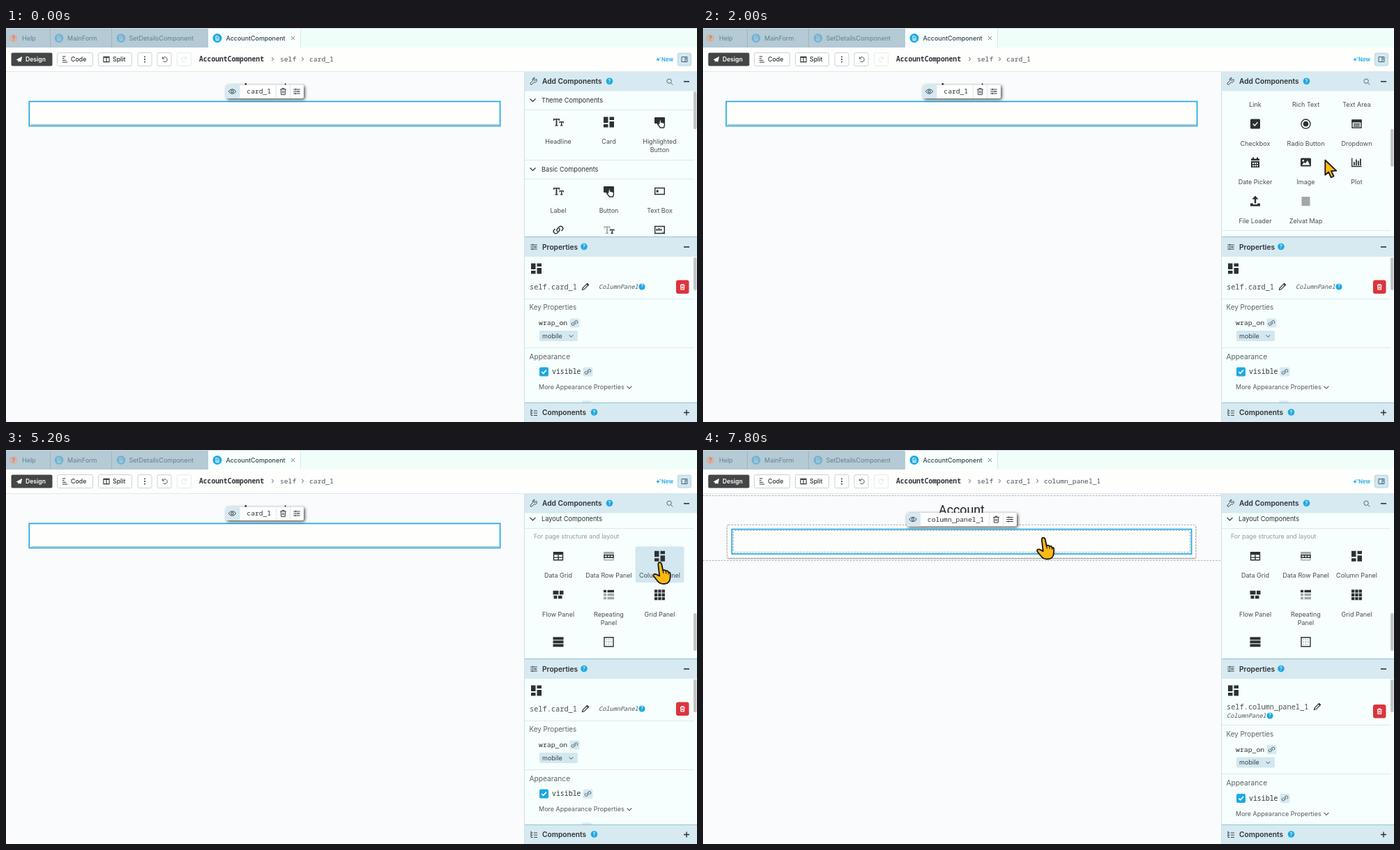
An HTML page with a canvas that plays this animation: 991 by 565 pixels, repeating every 8000 ms.

```html
<!DOCTYPE html>
<html lang="en">
<head>
<meta charset="utf-8">
<title>Form designer</title>
<style>
html, body { margin: 0; width: 100%; height: 100%; overflow: hidden; background: #fafbfd; }
canvas { display: block; }
</style>
</head>
<body>
<canvas id="stage" width="991" height="565"></canvas>
<script>
const ctx = document.getElementById('stage').getContext('2d');
const UI = 'Inter, "Open Sans", sans-serif';
const MONO = '"Noto Sans Mono", "DejaVu Sans Mono", monospace';
const INK = '#2d3135', SOFT = '#474c50', BLUE = '#1ea9e1', PALE = '#d6e9f1', MINT = '#f6fffd', LINE = '#dce8ec';
const LOOP = 8000, NOTCH = 69.15, SELECT = 5600, DROP = 7600;
const NOTCHES = [1250, 1500, 1750, 2250, 2600, 3250, 3500, 4300];

// f/g/w fill in ink, grey, white; s/h/x stroke in the same colours
const ICONS = {
  tt: 'f:M-7-5H2V-2H.8V-3.6H-1.6V4.2H-.4V5.4H-4.6V4.2H-3.4V-3.6H-5.8V-2H-7Z|f:M1.5-1H8V1.4H7V.3H5.5V4.3H6.4V5.4H3V4.3H4V.3H2.6V1.4H1.5Z',
  rich: 'g:M-7-5H2V-2H.8V-3.6H-1.6V4.2H-.4V5.4H-4.6V4.2H-3.4V-3.6H-5.8V-2H-7Z|f:M1.5-1H8V1.4H7V.3H5.5V4.3H6.4V5.4H3V4.3H4V.3H2.6V1.4H1.5Z',
  panel: 'f:M-7.5-7.5h6.5v8.5h-6.5zM-7.5 3h6.5v4.5h-6.5zM1-7.5h6.5v4.5h-6.5zM1-1h6.5v8.5h-6.5z',
  button: 'f:M-6.5-7h13q1 0 1 1v7q0 1-1 1h-13q-1 0-1-1v-7q0-1 1-1z|w:M0-3q1.2-1 2 0v3l4 1q1.5 1 1 3l-1 4h-5l-4-5q0-1.5 2-.6z|s:M0-3q1.2-1 2 0v3l4 1q1.5 1 1 3l-1 4h-5l-4-5q0-1.5 2-.6z',
  box: 's:M-6.8-4.5h13.6v9h-13.6z|f:M-4.8-1.6h3v3.2h-3z',
  area: 's:M-6.8-5h13.6v10h-13.6z|f:M-5-1.5h2v2.8h-2zM-2-2.5h2v3.8h-2zM1-1.5h2v2.8h-2zM4 3h2v1h-2z',
  link: 's:M-1 2.5A3.2 3.2 0 0 1-1-2l2.5-2.5A3.2 3.2 0 0 1 6 0L4.5 1.5M1-2.5A3.2 3.2 0 0 1 1 2L-1.5 4.5A3.2 3.2 0 0 1-6 0L-4.5-1.5',
  check: 'f:M-5.5-7h11q1.5 0 1.5 1.5v11q0 1.5-1.5 1.5h-11q-1.5 0-1.5-1.5v-11q0-1.5 1.5-1.5z|x:M-3.2 0L-.8 2.4 3.5-2.4',
  radio: 's:M6.6 0A6.6 6.6 0 1 1-6.6 0 6.6 6.6 0 1 1 6.6 0z|f:M3.8 0A3.8 3.8 0 1 1-3.8 0 3.8 3.8 0 1 1 3.8 0z',
  drop: 's:M-6.5-5.5h13v11h-13z|f:M-7-6h14v4h-14zM-4.5-.5h9v1.4h-9zM-4.5 2.3h9v1.4h-9z',
  date: 'f:M-6-5.5h12v2.5h-12zM-6-2h12v9h-12zM-4-7.5h2v3h-2zM2-7.5h2v3h-2z|w:M-4 0h2v2h-2zM-1 0h2v2h-2zM2 0h2v2h-2zM-4 3.5h2v2h-2zM-1 3.5h2v2h-2zM2 3.5h2v2h-2z',
  image: 'f:M-6-6.5h12q1.5 0 1.5 1.5v9q0 1.5-1.5 1.5h-12q-1.5 0-1.5-1.5v-9q0-1.5 1.5-1.5z|w:M-5.5 3.5L-2.5-.5-.8 1.2 2.5-3 5.8 3.5zM-5-4h2.4v2.4h-2.4z',
  plot: 's:M-6.8-6.5V5.5H7|f:M-4.5-1h1.8v5h-1.8zM-1.5-4.5h1.8v8.5h-1.8zM1.5-2.5h1.8v6.5h-1.8zM4.5-5.5h1.8v9.5h-1.8z',
  upload: 'f:M0-8L4.5-3H1.2V3H-1.2V-3H-4.5zM-7 3h4v1.5h6v-1.5h4v4h-14z',
  tile: 'f:M-5.5-5.5h11v11h-11z',
  greyTile: 'g:M-6-6.5h12v13h-12z',
  spacer: 's:M-7.5-6h15M-7.5 6h15M0-3.5V3.5M-2.5-1.8L0-4 2.5-1.8M-2.5 1.8L0 4 2.5 1.8',
  shapes: 'g:M0-8L3.8-1.5H-3.8zM-1 4A3.3 3.3 0 1 1-7.6 4 3.3 3.3 0 1 1-1 4z|f:M1 0h6.5v6.5h-6.5z',
  timer: 's:M0-6.5A6.5 6.5 0 1 1-5-4M0-6.5V-3.5M0 0L-3-3',
  grid: 's:M-6.5-5.5h13v11h-13zM-6.5 1.8h13M0-2v7.5|f:M-7-6h14v4h-14z',
  rowPanel: 'h:M-6.5-5.5h13v11h-13z|g:M-7-6h14v3h-14z|s:M-6.5-1.5h13v3.5h-13zM-2-1.5v3.5M2-1.5v3.5',
  flow: 'f:M-7.5-6h8v5.5h-8zM2-6h5.5v5.5H2zM-6.5 1h5v4.5h-5zM0 1h5.5v4.5H0z',
  repeat: 'f:M-7.5-7h4v3.5h-4zM-2-7h9.5v3.5h-9.5z|g:M-7.5-2h4v3.5h-4zM-2-2h9.5v3.5h-9.5zM-7.5 3h4v3.5h-4zM-2 3h9.5v3.5h-9.5z',
  nine: 'f:' + [-7.5, -2.2, 3.1].map(y => [-7.5, -2.2, 3.1].map(x => `M${x} ${y}h4.3v4.3h-4.3z`).join('')).join(''),
  bars: 'f:M-7.5-7h15v4h-15zM-7.5-2h15v4h-15zM-7.5 3h15v4h-15z',
  frame: 's:M-6.5-6.5h13v13h-13z|h:M-4 0h1.5M-1 0h2M2.5 0h1.5M0-4v1.5M0 2.5v1.5M-3.5-3.5h1M2.5-3.5h1M-3.5 3.5h1M2.5 3.5h1',
  plane: 'f:M5-5L3 4.5 0 3-1.5 5-2 2-5 .5z',
  code: 's:M-4-4h5M-4-1h3M-4 2h6M-4 5h8',
  split: 's:M-4.5-4h9v8h-9zM0-4v8M-4.5-3h9',
  dots: 'f:M-.8-4.5h1.6v1.8h-1.6zM-.8-.9h1.6v1.8h-1.6zM-.8 2.7h1.6v1.8h-1.6z',
  undo: 's:M-3.5-4v3h3M-3.2-1.3A3.8 3.8 0 1 1-2.5 2.8',
  redo: 's:M3.5-4v3h-3M3.2-1.3A3.8 3.8 0 1 0 2.5 2.8',
  spark: 'f:M-.5-3.5L.5-.7 3.3.3.5 1.3-.5 4-1.5 1.3-4.3.3-1.5-.7zM3-4l.5 1 1 .5-1 .5-.5 1-.5-1-1-.5 1-.5z',
  side: 's:M-4-3.5h8v7h-8zM1-3.5v7M2-1.5h1M2 0h1',
  wrench: 's:M3.8-3.5L2-1.8 0-2-.2-4 1.5-5.2C-.8-6-2.5-3.5-1.5-1.2L-5 2.5Q-5.5 4.5-3.2 4.5L.5 1C3 2 5.2-.5 3.8-3.5z',
  search: 's:M2.3-.8A3.2 3.2 0 1 1-4.1-.8 3.2 3.2 0 1 1 2.3-.8zM1.5 1.6L4.3 4.4',
  minus: 'f:M-4-.8h8v1.6h-8z',
  plus: 'f:M-4-.7h3.3V-4H.7v3.3H4V.7H.7V4H-.7V.7H-4z',
  sliders: 's:M-4.8-3h9.6M-4.8 0h9.6M-4.8 3h9.6M-1.5-4.2v2.4M2-1.2v2.4M-2 1.8v2.4',
  pencil: 's:M-4.5 4.5l.7-2.6L2-3.9l1.9 1.9-5.8 5.8z|f:M1.3-4l1.5-1.3 2.5 2.5L4-1.3z',
  trash: 's:M-4.3-3h8.6M-1.5-3v-1.5h3V-3M-3.3-3l.5 7.6h5.6l.5-7.6M-1-.9v3.5M1-.9v3.5',
  eye: 's:M-5.3 0Q0-6.5 5.3 0 0 6.5-5.3 0zM1.7 0A1.7 1.7 0 1 1-1.7 0 1.7 1.7 0 1 1 1.7 0z',
  tree: 's:M-4-5v9M-4-2.5h2.5M-4 .7h2.5M-4 4h2.5M0-2.5h5M0 .7h5M0 4h5',
  chevron: 's:M-4-2L0 2 4-2',
  cross: 's:M-2.4-2.4l4.8 4.8M2.4-2.4l-4.8 4.8',
  doc: 's:M-2-3h2.5l1.7 1.7V3.2H-2zM-.8.2h1.8M-.8 1.6h1.8'
};
for (const k in ICONS) ICONS[k] = ICONS[k].split('|').map(p => [p[0], new Path2D(p.slice(2))]);

const HAND = new Path2D('M-2.6 3Q-3-.8-.6-.8T2.5 2.5L4.2 11Q6.5 9 8.3 11.5 11 10.3 12 13.2 14.8 13 14.8 16.5L14.5 22Q13.5 30 5.5 30-.5 30-3.5 26L-9.5 18.5Q-9.5 15.2-6 16L-.8 18.6z');
const ARROW = new Path2D('M.3 0V21.2L5.2 17 8.8 24.8 12.6 23 9 15.6 16.3 15.2z');
const KNUCKLES = new Path2D('M4.2 11l.8 4M8.3 11.8l.5 3.6M12 13.4l.2 3');

const COLS = [792, 864.5, 937.5];
const SECTIONS = [
  ['Theme Components', 103.5, 0],
  ['Basic Components', 202.5, 189],
  ['More Components', 510.5, 497],
  ['Layout Components', 652, 638]
];
const ROWS = [
  [135, 'Headline:tt', 'Card:panel', 'Highlighted/Button:button'],
  [234, 'Label:tt', 'Button:button', 'Text Box:box'],
  [289.5, 'Link:link', 'Rich Text:rich', 'Text Area:area'],
  [345, 'Checkbox:check', 'Radio Button:radio', 'Dropdown:drop'],
  [400.5, 'Date Picker:date', 'Image:image', 'Plot:plot'],
  [456, 'File Loader:upload', 'Zelvat Map:greyTile'],
  [542, 'Vundelo Video:tile', 'Spacer:spacer', 'Canvas:shapes'],
  [597.5, 'Timer:timer'],
  [705.5, 'Data Grid:grid', 'Data Row Panel:rowPanel', 'Column Panel:panel'],
  [761, 'Flow Panel:flow', 'Repeating/Panel:repeat', 'Grid Panel:nine'],
  [828.5, 'Linear Panel:bars', 'XY Panel:frame']
];

const clamp = v => Math.max(0, Math.min(1, v));
const easeOut = v => 1 - (1 - clamp(v)) ** 2;
const easeIn = v => clamp(v) ** 2;
const smooth = v => { v = clamp(v); return v * v * (3 - 2 * v); };
const mix = (a, b, k) => a + (b - a) * k;

function rect(x, y, w, h, fill, r = 0, stroke) {
  ctx.beginPath();
  ctx.roundRect(x, y, w, h, r);
  if (fill) { ctx.fillStyle = fill; ctx.fill(); }
  if (stroke) { ctx.strokeStyle = stroke; ctx.lineWidth = 1; ctx.stroke(); }
}

function text(s, x, y, size, { c = INK, w = 400, a = 'left', f = UI, i = '' } = {}) {
  ctx.font = `${i} ${w} ${size}px ${f}`;
  ctx.textAlign = a;
  ctx.fillStyle = c;
  ctx.fillText(s, x, y + size * .35);
}
const mono = (s, x, y, size, o) => text(s, x, y, size, { f: MONO, ...o });

function icon(name, x, y, c = INK, s = 1, lw = 1.4) {
  const col = { f: c, s: c, g: '#a3a6a8', h: '#a3a6a8', w: MINT, x: '#fff' };
  ctx.save();
  ctx.translate(x, y);
  ctx.scale(s, s);
  ctx.lineWidth = lw;
  for (const [m, p] of ICONS[name]) {
    ctx.fillStyle = ctx.strokeStyle = col[m];
    'fgw'.includes(m) ? ctx.fill(p) : ctx.stroke(p);
  }
  ctx.restore();
}

function dot(x, y, r, c) {
  ctx.beginPath();
  ctx.arc(x, y, r, 0, 7);
  ctx.fillStyle = c;
  ctx.fill();
}

function help(x, y, r = 4.8, c = BLUE, ink = '#fff') {
  dot(x, y, r, c);
  text('?', x, y, r * 1.5, { c: ink, w: 500, a: 'center' });
}

function dashed(x, y, w, h) {
  ctx.setLineDash([2.5, 1.8]);
  rect(x, y, w, h, null, 2, '#a6a8ab');
  ctx.setLineDash([]);
}

function dashRule(y) {
  ctx.setLineDash([2.5, 1.8]);
  ctx.strokeStyle = '#b0b2b5';
  ctx.lineWidth = 1;
  ctx.beginPath();
  ctx.moveTo(0, y);
  ctx.lineTo(743, y);
  ctx.stroke();
  ctx.setLineDash([]);
}

function tabs() {
  rect(0, 0, 991, 28, '#f0fefa');
  rect(0, 0, 290, 28, '#b4cad5');
  rect(290, 0, 132, 28, '#f8fffd');
  [63, 151].forEach(x => rect(x, 1, 1, 27, '#9cb5c2'));
  rect(422, 0, 1, 28, LINE);
  rect(0, 0, 991, 1, '#d2dde1');
  const dim = { c: '#64808e' };
  help(10.5, 14.5, 6, '#d6b3a9', '#a8766b');
  text('Help', 23, 14.5, 9, dim);
  [76, 165].forEach(x => { dot(x, 14.5, 6.3, '#72b3d1'); icon('doc', x, 14.5, '#b9d3df', 1, 1); });
  text('MainForm', 88, 14.5, 9, dim);
  text('SetDetailsComponent', 176.5, 14.5, 9, dim);
  dot(303, 14.5, 6.5, BLUE);
  icon('doc', 303, 14.5, '#fff', 1, 1);
  text('AccountComponent', 315.5, 14.5, 8.9, { c: '#2f4450', w: 500 });
  icon('cross', 411.5, 14.5, '#5f6f78', 1, 1);
}

function toolbar(dropped) {
  rect(0, 28, 991, 35, '#fefffd');
  rect(0, 62, 991, 1, LINE);
  rect(7.5, 35.5, 59, 19, '#434547', 2);
  icon('plane', 19, 45, '#fff', .85);
  text('Design', 28, 45, 8.6, { c: '#fff', w: 600 });
  [[73, 52], [132, 49], [188.5, 21], [216.5, 21]].forEach(([x, w]) => rect(x + .5, 35.5, w - 1, 19, null, 2, '#cbd3d7'));
  rect(245.5, 35.5, 20, 19, null, 2, '#e6ebec');
  icon('code', 84.5, 44.5, INK, .9, 1.1);
  text('Code', 93, 45, 8.8, { w: 500 });
  icon('split', 144, 45, INK, .9, 1.2);
  text('Split', 153, 45, 8.8, { w: 500 });
  icon('dots', 199, 45);
  icon('undo', 227.5, 45, SOFT, .9, 1.1);
  icon('redo', 255.5, 45, '#dde3e5', .9, 1.1);
  const grey = { c: '#4c5156' };
  mono('AccountComponent', 277, 44.7, 9.7, { w: 600 });
  mono('self', 393, 44.7, 9.7, grey);
  mono('card_1', 435, 44.7, 9.7, grey);
  const arrows = dropped ? [382.5, 425.5, 479.5] : [382.5, 425.5];
  if (dropped) mono('column_panel_1', 489, 44.7, 9.7, grey);
  ctx.strokeStyle = SOFT;
  ctx.lineWidth = 1;
  for (const x of arrows) {
    ctx.beginPath();
    ctx.moveTo(x - 1.3, 42);
    ctx.lineTo(x + 1.3, 44.5);
    ctx.lineTo(x - 1.3, 47);
    ctx.stroke();
  }
  icon('spark', 935.5, 45, BLUE, .85);
  text('New', 940, 45.5, 7.8, { c: BLUE, w: 600 });
  rect(963.5, 36, 19, 18, '#d2e7f0', 2, '#b7d5e2');
  icon('side', 973, 45, '#47616e', 1, 1);
}

function popup(l, r, y, name) {
  ctx.save();
  ctx.shadowColor = 'rgba(0,0,0,.75)';
  ctx.shadowBlur = 4;
  ctx.shadowOffsetX = ctx.shadowOffsetY = 1.5;
  rect(l, y, r - l, 19.5, '#fff', 2);
  ctx.restore();
  rect(l, y, 20, 19.5, PALE, 2);
  const cy = y + 9.5;
  icon('eye', l + 9, cy, '#35424a', 1, 1);
  mono(name, (l + r) / 2 - 8.5, cy, 9.7, { a: 'center' });
  rect(r - 40, y, 1, 19.5, LINE);
  rect(r - 20, y, 1, 19.5, LINE);
  icon('trash', r - 29.5, cy, '#3a3e42', 1, 1);
  icon('sliders', r - 10, cy, '#3a3e42', 1, 1);
}

function outline(x, y, w, h) {
  ctx.strokeStyle = BLUE;
  ctx.lineWidth = 1.7;
  ctx.strokeRect(x, y, w, h);
}

function designer(t) {
  const dropped = t >= DROP, placing = t >= SELECT;
  rect(0, 63, 743, 502, '#fafbfd');
  text('Account', 371, 85.6, 17.8, { c: '#222', a: 'center', f: 'Roboto, sans-serif' });
  const h = dropped ? 48 : 32;
  if (placing) {
    ctx.save();
    ctx.shadowColor = 'rgba(0,0,0,.4)';
    ctx.shadowBlur = 2;
    ctx.shadowOffsetY = 1;
    rect(35, 107, 672, h, '#fefffd', 2);
    ctx.restore();
    dashRule(65.5);
    dashRule(dropped ? 158.5 : 141.5);
    dashed(34.5, 107.5, 672, h - .5);
  } else {
    rect(33, 105, 676, 35, '#fefffd');
    rect(36, 138, 671, 1, '#b3b8ba');
    outline(33.3, 105.4, 675.3, 35);
  }
  if (dropped) {
    outline(41.4, 113.6, 659.2, 35.4);
    dashed(43.5, 115.5, 655, 31);
    popup(292, 450, 90, 'column_panel_1');
  } else popup(315.5, 427, 81.5, 'card_1');
}

function header(y, h, ico, label, q, end) {
  rect(744, y, 247, h, '#d7e9f1');
  const cy = y + h / 2;
  icon(ico, 757, cy, '#37474f', 1, 1);
  text(label, 769, cy, 10.2, { w: 600 });
  help(q, cy - .5);
  icon(end, 976, cy);
}

function palette(t, cur) {
  const scroll = NOTCH * NOTCHES.reduce((n, s) => n + easeOut((t - s) / 200), 0);
  ctx.save();
  ctx.beginPath();
  ctx.rect(744, 90, 247, 209);
  ctx.clip();
  rect(744, 90, 247, 209, MINT);
  for (const [name, y, top] of SECTIONS) {
    if (top) rect(744, Math.round(top - scroll), 242, 1, LINE);
    icon('chevron', 755.5, y - scroll, INK, 1, 1.2);
    text(name, 768, y - scroll, 9.2);
    rect(744, Math.round(y + 13.5 - scroll), 242, 1, LINE);
  }
  text('For page structure and layout', 757, 677 - scroll, 8.8, { c: '#92999d' });
  for (const [base, ...items] of ROWS) {
    const y = base - scroll;
    items.forEach((item, i) => {
      const [label, ico] = item.split(':'), x = COLS[i];
      const chosen = label === 'Column Panel' && t >= SELECT && t < DROP;
      const over = cur.hand && Math.abs(cur.x - x) < 35 && cur.y > y - 14 && cur.y < y + 38;
      if (over) rect(x - 35, y - 14, 70, 52, '#d3e7f0', 3);
      if (chosen) rect(x - 34.5, y - 13.5, 69, 51, null, 3, BLUE);
      icon(ico, x, y);
      label.split('/').forEach((s, n) => text(s, x, y + 27.8 + n * 12, 9, { a: 'center', c: SOFT }));
    });
  }
  rect(986, 91 + scroll * .2586, 4.5, 54, '#c2c5c6', 2);
  ctx.restore();
}

function chip(x, y) {
  rect(x - 7, y - 6.5, 14, 13, PALE, 2);
  icon('link', x, y, '#3d5058', .65, 1.4);
}

function properties(dropped) {
  const d = dropped ? 6.5 : 0;
  rect(744, 328, 247, 209, MINT);
  icon('panel', 760.5, 345);
  mono(dropped ? 'self.column_panel_1' : 'self.card_1', 751, dropped ? 368.5 : 371, 10.3, { c: '#4c5155' });
  icon('pencil', dropped ? 881 : 831, dropped ? 368 : 371, INK, 1, 1.2);
  const [tx, ty] = dropped ? [751, 381] : [850, 371];
  mono('ColumnPanel', tx, ty, 8.6, { c: '#4c5155', i: 'italic' });
  help(tx + 62, ty, 4.6);
  const by = dropped ? 365 : 361.5;
  rect(961, by, 18.5, 19.5, '#dc343d', 3);
  icon('trash', 970.2, by + 9.7, '#fff', .8, 1.4);
  rect(744, Math.floor(388 + d), 242, 1, LINE);
  const head = { c: '#5b6267' };
  text('Key Properties', 750.5, 401 + d, 9.8, head);
  mono('wrap_on', 764, 423 + d, 9.8, { w: 500 });
  chip(815.5, 423 + d);
  rect(765, 434 + d, 55, 15, '#d3e7ef', 2);
  text('mobile', 769, 441.5 + d, 9.1, { c: '#3a4449' });
  icon('chevron', 810.5, 441.8 + d, INK, .7, 1.3);
  rect(744, Math.floor(458 + d), 242, 1, LINE);
  text('Appearance', 750.5, 471 + d, 10.2, head);
  rect(765, 486.5 + d, 13, 13, BLUE, 2);
  ctx.strokeStyle = '#fff';
  ctx.lineWidth = 1.6;
  ctx.beginPath();
  ctx.moveTo(768.3, 493 + d);
  ctx.lineTo(770.6, 495.3 + d);
  ctx.lineTo(775, 490.5 + d);
  ctx.stroke();
  mono('visible', 783, 493 + d, 9.9, { w: 500 });
  chip(834.5, 493 + d);
  text('More Appearance Properties', 764, 515 + d, 9, { c: '#555c61' });
  icon('chevron', 894, 515.3 + d, SOFT, .85, 1.2);
  if (!dropped) rect(826, 534.5, 14, 3, PALE, 2);
  rect(986, 329, 4.5, 47, '#c2c5c6', 2);
}

function pointer(t) {
  let x, y;
  if (t < 4600) {
    const k = easeOut((t - 100) / 800);
    x = mix(978, 892, k);
    y = mix(520, 189.5, k);
  } else if (t < 5700) {
    const k = smooth((t - 4600) / 500);
    x = mix(892, 938, k);
    y = mix(189.5, 162, k);
  } else if (t < 6400) {
    const k = easeIn((t - 5700) / 700);
    x = mix(938, 766, k);
    y = mix(162, 169, k);
  } else {
    const k = easeOut((t - 6400) / 800);
    x = mix(766, 488.5, k);
    y = mix(169, 126.5, k);
  }
  return { x, y, hand: t > 4600 && x > 902 || t > 5000, shown: t >= 200 };
}

function drawPointer({ x, y, hand, shown }) {
  if (!shown) return;
  const p = hand ? HAND : ARROW;
  ctx.save();
  ctx.translate(x, y);
  ctx.lineJoin = 'round';
  ctx.fillStyle = '#fdb913';
  ctx.strokeStyle = '#15171a';
  ctx.lineWidth = 1.8;
  ctx.fill(p);
  ctx.stroke(p);
  if (hand) {
    ctx.lineWidth = 1.2;
    ctx.stroke(KNUCKLES);
  }
  ctx.restore();
}

function draw(t) {
  const dropped = t >= DROP, cur = pointer(t);
  tabs();
  toolbar(dropped);
  designer(t);
  palette(t, cur);
  properties(dropped);
  header(63, 27.5, 'wrench', 'Add Components', 865.5, 'minus');
  icon('search', 952, 77, '#5d686e', 1, 1);
  header(300, 28, 'sliders', 'Properties', 829, 'minus');
  header(538, 27, 'tree', 'Components', 843.5, 'plus');
  [299, 537].forEach(y => rect(744, y, 247, 1, '#8cc4d6'));
  rect(743, 63, 1, 502, '#cfe0e6');
  drawPointer(cur);
}

const start = performance.now();
function tick() {
  draw((performance.now() - start) % LOOP);
  requestAnimationFrame(tick);
}
tick();
</script>
</body>
</html>
```
